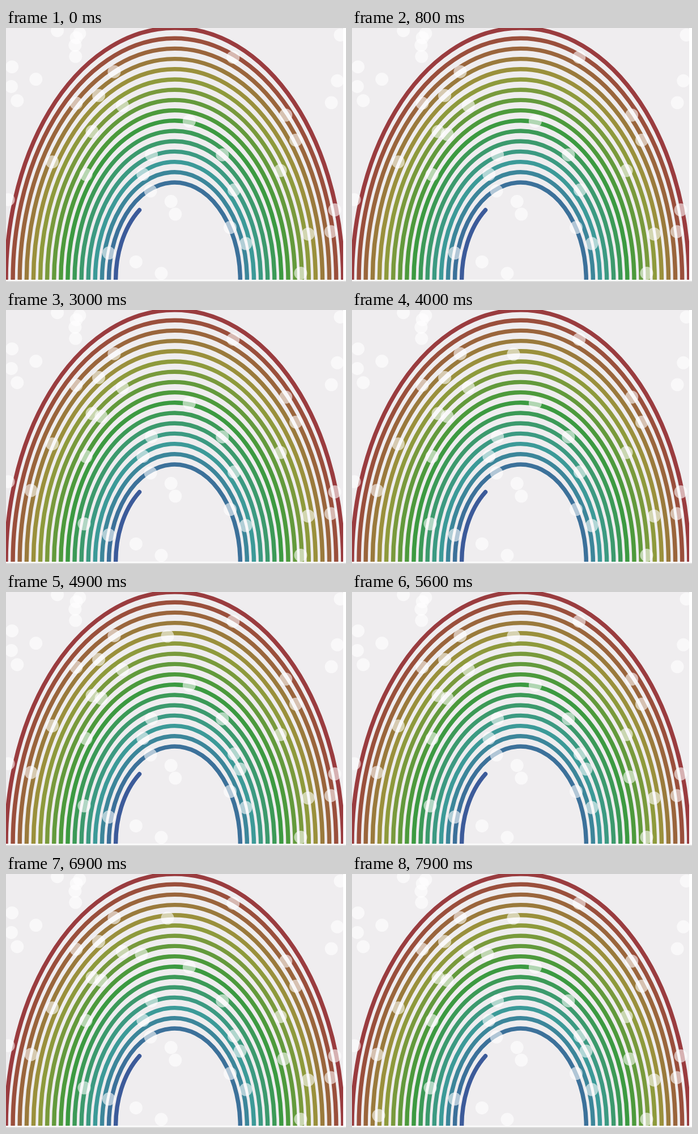
Animation of 600x449 px, one loop 8000 ms. Source, as an HTML page with a canvas:

```html
<!DOCTYPE html>
<html lang="en">
<head>
<meta charset="utf-8">
<title>Rainbow</title>
<style>
  html, body { margin: 0; width: 100%; height: 100%; overflow: hidden; background: #fff; }
  canvas { display: block; }
</style>
</head>
<body>
<canvas id="stage" width="600" height="449"></canvas>
<script>
const ctx = document.getElementById("stage").getContext("2d");
const LOOP = 8000;
const WIDTH = 595, HEIGHT = 445;
const CX = 297.4, CY = 446;
const ARCHES = 17;
const STEP_X = 12.1, STEP_Y = 18.2;
const DOTS = 41, DOT_R = 11.5;
const FIRST = 300, EVERY = 1000;

function randomFrom(seed) {
  return () => {
    seed = (seed * 16807) % 2147483647;
    return seed / 2147483647;
  };
}

// Scattered dots that are there from the start
const rand = randomFrom(2024);
const dots = Array.from({ length: DOTS }, () => [rand() * WIDTH, rand() * HEIGHT]);

// One of these pops in every second
const extras = [
  [168, 188], [138, 378], [44, 319], [285, 78],
  [413, 313], [490, 327], [239, 142], [47, 427]
];

function drawArch(i) {
  const last = i === ARCHES - 1;
  const end = last ? Math.PI + 0.932 : Math.PI * 2 + 0.05;
  ctx.strokeStyle = `hsl(${358 + i * 13.9}, 44%, 42%)`;
  ctx.beginPath();
  ctx.ellipse(CX, CY, CX - i * STEP_X, CY - i * STEP_Y, 0, Math.PI - 0.05, end);
  ctx.stroke();
}

function drawDot([x, y]) {
  ctx.beginPath();
  ctx.arc(x, y, DOT_R, 0, Math.PI * 2);
  ctx.fill();
}

function draw(t) {
  ctx.fillStyle = "#fff";
  ctx.fillRect(0, 0, 600, 449);
  ctx.fillStyle = "#bdbdbd";
  ctx.fillRect(0, 447.5, 600, 1);

  ctx.save();
  ctx.beginPath();
  ctx.rect(0, 0, WIDTH, HEIGHT);
  ctx.clip();
  ctx.fillStyle = "#efedef";
  ctx.fillRect(0, 0, WIDTH, HEIGHT);

  ctx.lineWidth = 7.4;
  ctx.lineCap = "round";
  for (let i = 0; i < ARCHES; i++) drawArch(i);

  ctx.fillStyle = "rgba(255, 255, 255, 0.6)";
  dots.forEach(drawDot);
  const count = Math.max(0, Math.floor((t - FIRST) / EVERY) + 1);
  extras.slice(0, count).forEach(drawDot);
  ctx.restore();
}

const start = performance.now();
function frame() {
  draw((performance.now() - start) % LOOP);
  requestAnimationFrame(frame);
}
frame();
</script>
</body>
</html>
```
